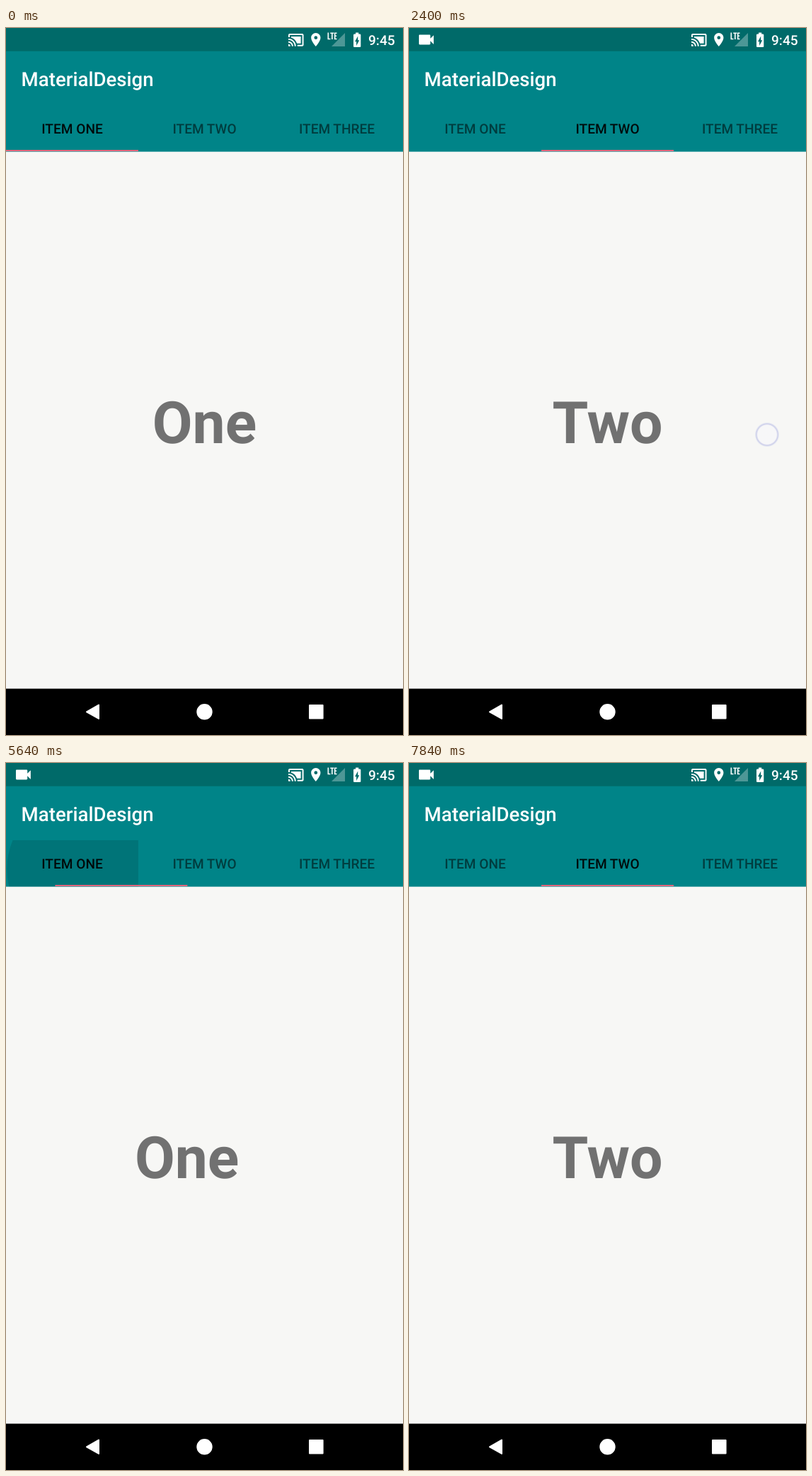
These frames come from a looping animation (561 by 998 pixels, 8000 ms). An HTML page:

```html
<!DOCTYPE html>
<html lang="en">
<head>
<meta charset="utf-8">
<title>Tabs</title>
<style>
  html, body { margin: 0; width: 100%; height: 100%; overflow: hidden; background: #000; }
  svg { display: block; width: 561px; height: 998px; font-family: Roboto, sans-serif; font-weight: 500; text-rendering: geometricPrecision; }
  .tab { font-size: 19.1px; text-anchor: middle; }
  .page { font-size: 82.3px; font-weight: 700; text-anchor: middle; fill: #717171; }
</style>
</head>
<body>
<svg viewBox="0 0 561 998">
  <defs>
    <radialGradient id="spot">
      <stop offset=".76" stop-color="#f7f7f9" stop-opacity=".83"/>
      <stop offset=".87" stop-color="#c0c2e6" stop-opacity=".8"/>
      <stop offset="1" stop-color="#c8d4ee" stop-opacity="0"/>
    </radialGradient>
    <clipPath id="tabClip"><rect id="tabBox" y="109" width="187" height="65.6"/></clipPath>
  </defs>
  <rect width="561" height="933" fill="#f7f7f5"/>
  <g id="pages"></g>
  <rect width="561" height="174.6" fill="#008488"/>
  <rect width="561" height="32.7" fill="#006a69"/>
  <text x="21.6" y="81.6" font-size="27.6" fill="#fff">MaterialDesign</text>
  <g clip-path="url(#tabClip)"><circle id="ripple"/></g>
  <g id="tabs"></g>
  <rect id="indicator" y="172" width="187" height="2" fill="#e0667c"/>

  <g fill="#fff">
    <path id="camera" transform="translate(10.5 2.6) scale(1.16)" d="M17 10.5V7c0-.55-.45-1-1-1H4c-.55 0-1 .45-1 1v10c0 .55.45 1 1 1h12c.55 0 1-.45 1-1v-3.5l4 4v-11l-4 4z"/>
    <path transform="translate(398 5.1) scale(.98)" d="M1 18v3h3c0-1.66-1.34-3-3-3zm0-4v2c2.76 0 5 2.24 5 5h2c0-3.87-3.13-7-7-7zm18-7H5v1.63c3.96 1.28 7.09 4.41 8.37 8.37H19zM1 10v2c4.97 0 9 4.03 9 9h2c0-6.08-4.93-11-11-11zm20-7H3c-1.1 0-2 .9-2 2v3h2V5h18v14h-7v2h7c1.1 0 2-.9 2-2V5c0-1.1-.9-2-2-2z"/>
    <path transform="translate(426.4 5.1) scale(.95)" d="M12 2C8.13 2 5 5.13 5 9c0 5.25 7 13 7 13s7-7.75 7-13c0-3.87-3.13-7-7-7zm0 9.5a2.5 2.5 0 1 1 0-5 2.5 2.5 0 0 1 0 5z"/>
    <path d="M479 7v19h-19z" opacity=".3"/>
    <path d="M455.3 6.5v9h3.2M458.3 7.3h5M460.8 7v9M467.5 7.3h-2.8v8.2h2.8M464.7 11.3h2.4" fill="none" stroke="#fff" stroke-width="1.6"/>
    <path transform="translate(483.8 4.4) scale(1.03)" d="M15.67 4H14V2h-4v2H8.33C7.6 4 7 4.6 7 5.33v15.33C7 21.4 7.6 22 8.33 22h7.33c.74 0 1.34-.6 1.34-1.33V5.33C17 4.6 16.4 4 15.67 4zM11 20v-5.5H9L13 7v5.5h2z"/>
    <text x="512" y="24" font-size="19.1">9:45</text>
  </g>

  <rect y="932.6" width="561" height="66"/>
  <g fill="#fff" stroke="#fff" stroke-width="2" stroke-linejoin="round">
    <path d="M114 965.3L131 955.5V975z"/>
    <circle cx="280.5" cy="965.3" r="10.2"/>
    <rect x="429" y="956" width="18.6" height="18.6"/>
  </g>
  <circle id="touch" r="17.5" fill="url(#spot)"/>
</svg>

<script>
const WIDTH = 561, TAB = WIDTH / 3, LOOP = 8000, STEP = 40;
const NAMES = ['One', 'Two', 'Three'];
const $ = id => document.getElementById(id);

function addText(parent, cls, y, text) {
  const el = document.createElementNS('http://www.w3.org/2000/svg', 'text');
  el.setAttribute('class', cls);
  el.setAttribute('y', y);
  el.textContent = text;
  return $(parent).appendChild(el);
}
function set(el, attrs) {
  for (const key in attrs) el.setAttribute(key, attrs[key]);
}

const pages = NAMES.map(name => addText('pages', 'page', 585.5, name));
const tabs = NAMES.map((name, i) => {
  const el = addText('tabs', 'tab', 149.2, 'ITEM ' + name.toUpperCase());
  set(el, { x: (i + .5) * TAB });
  return el;
});

const progress = (t, from, to) => Math.min(1, Math.max(0, (t - from) / (to - from)));
const mix = (a, b, k) => a + (b - a) * k;
const settle = k => 1 - (1 - k) ** 5;

// cubic-bezier(.4, 0, .2, 1)
function fastOutSlowIn(x) {
  let lo = 0, hi = 1, u = .5;
  for (let i = 0; i < 20; i++) {
    u = (lo + hi) / 2;
    if (1.2 * u * (1 - u) ** 2 + .6 * u * u * (1 - u) + u ** 3 < x) lo = u; else hi = u;
  }
  return u * u * (3 - 2 * u);
}

const swipes = [
  { from: 0, down: 560, start: 760, release: 920, end: 1200, x: [513, 0], y: [594, 583], bow: 20, drag: .866 },
  { from: 1, down: 2400, start: 2440, release: 2640, end: 2880, x: [506, 16], y: [574, 578], bow: 6, drag: .84 }
];
const taps = [
  { from: 2, to: 0, down: 5320, x: 106, y: 149.5 },
  { from: 0, to: 1, down: 7040, x: 290, y: 149.5 }
];

function stateAt(t) {
  const s = { page: 0, bar: 0, selected: 0, touch: null, ripple: null };
  for (const w of swipes) {
    if (t < w.down) continue;
    const drag = progress(t, w.start, w.release);
    s.page = s.bar = w.from + mix(w.drag * drag, 1, settle(progress(t, w.release, w.end)));
    s.selected = w.from + (t >= w.release);
    s.touch = {
      x: mix(...w.x, drag),
      y: mix(...w.y, drag) + w.bow * 4 * drag * (1 - drag),
      alpha: 1 - progress(t, w.release + STEP, w.release + 240)
    };
  }
  for (const p of taps) {
    if (t < p.down) continue;
    const click = p.down + 160, delta = Math.abs(p.to - p.from);
    s.page = mix(p.from, p.to, settle(progress(t, click, click + 100 * (delta + 1))));
    s.bar = mix(p.from, p.to, fastOutSlowIn(progress(t, click, click + 300)));
    s.selected = t > click ? p.to : p.from;
    s.touch = { x: p.x, y: p.y, alpha: 1 - progress(t, p.down + 120, p.down + 320) };
    s.ripple = {
      tab: p.to, x: p.x, y: p.y,
      radius: 115 * (1 - (1 - progress(t, p.down + 40, p.down + 440)) ** 2),
      alpha: .12 * (1 - progress(t, p.down + 360, p.down + 800))
    };
  }
  return s;
}

function draw() {
  const t = Math.floor(performance.now() % LOOP / STEP) * STEP;
  const { page, bar, selected, touch, ripple } = stateAt(t);
  pages.forEach((el, i) => set(el, { x: WIDTH * (i - page + .5) }));
  tabs.forEach((el, i) => set(el, { 'fill-opacity': i === selected ? .92 : .54 }));
  set($('indicator'), { x: TAB * bar });
  set($('camera'), { opacity: progress(t, 0, 280) });
  set($('touch'), touch ? { cx: touch.x, cy: touch.y, opacity: touch.alpha } : { opacity: 0 });
  set($('ripple'), ripple ? { cx: ripple.x, cy: ripple.y, r: ripple.radius, opacity: ripple.alpha } : { opacity: 0 });
  if (ripple) set($('tabBox'), { x: TAB * ripple.tab });
  requestAnimationFrame(draw);
}
draw();
</script>
</body>
</html>
```
